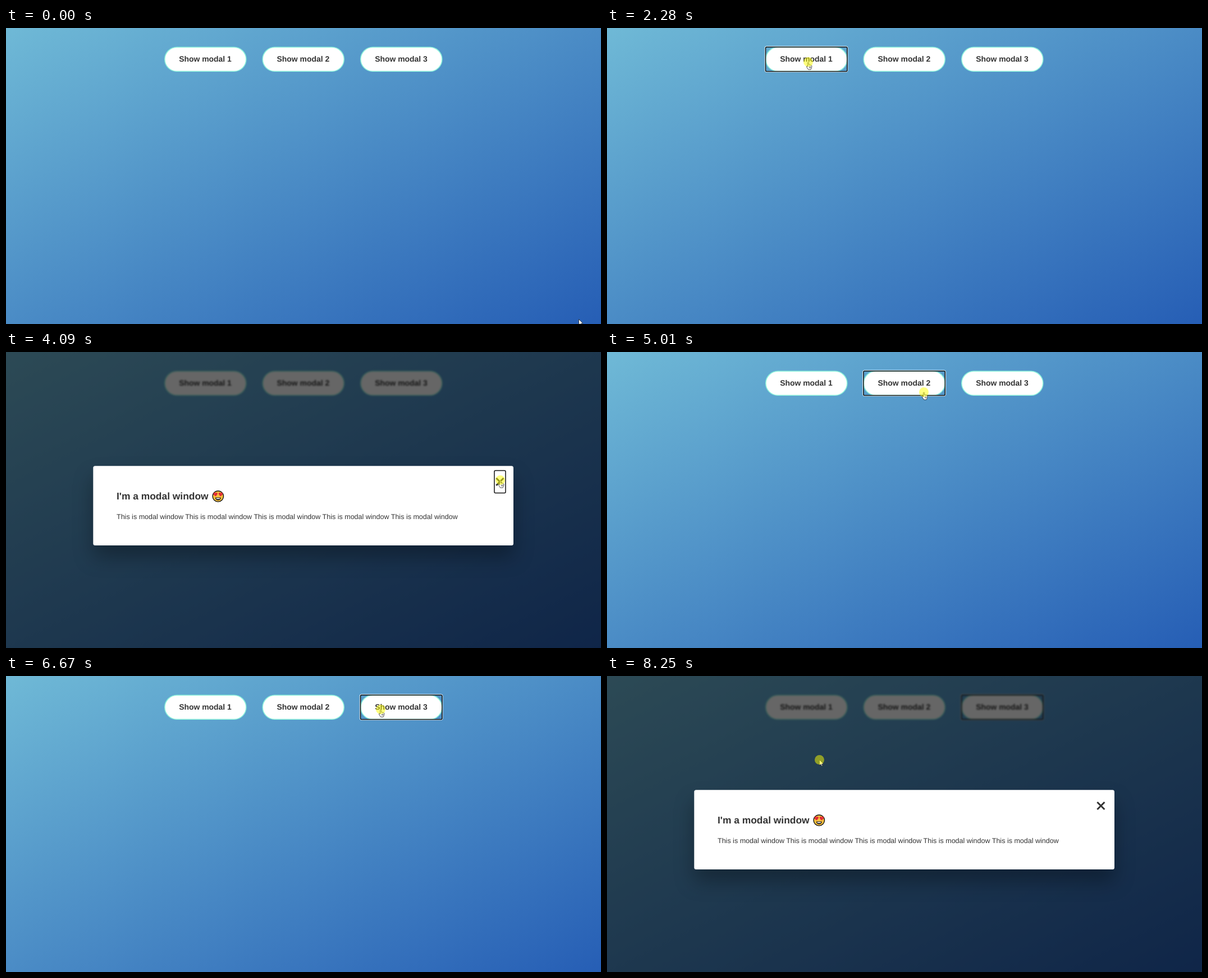
An HTML page that plays this animation: 1060x528 px, repeating every 8.32 s.

```html
<!DOCTYPE html>
<html lang="en">
<head>
<meta charset="utf-8">
<title>Modal windows</title>
<style>
  html, body { margin: 0; width: 100%; height: 100%; overflow: hidden; }
  body { background: linear-gradient(to bottom right, #6fb9d6, #265eb5); }
  svg { position: absolute; left: 0; top: 0; display: block; }
  text { font-family: Arial, "Liberation Sans", sans-serif; fill: #333; text-rendering: geometricPrecision; }
  .label { font-size: 13.95px; font-weight: bold; text-anchor: middle; }
  .title { font-size: 17.4px; font-weight: bold; }
  .copy { font-size: 12.53px; }
  .pill { fill: #fff; stroke: #8ff3dc; stroke-width: 1.6; }
  .panel { fill: #fff; filter: drop-shadow(0 21px 17px rgba(0, 0, 0, .3)); }
  .cross { stroke: #333; stroke-width: 3; }
  .ring { fill: none; stroke: #101010; stroke-width: 1.5; }
  .glow { fill: none; stroke: #fff; }
  .cursor { fill: #fff; stroke: #222; stroke-width: .8; stroke-linejoin: round; }
  .blurred { filter: blur(1.8px); }
</style>
</head>
<body>
<svg width="1060" height="528" viewBox="0 0 1060 528">
  <g id="buttons"></g>
  <g id="modal">
    <rect width="1060" height="528" fill="#000" opacity=".6"/>
    <rect class="panel" x="155.3" y="203.3" width="748.7" height="141.7" rx="3.5"/>
    <text class="title" x="197" y="263.3">I'm a modal window</text>
    <g transform="translate(377.8 257.4)">
      <circle id="face" r="9.7" stroke="#111" stroke-width="1.4"/>
      <g id="hearts" fill="#e32b35">
        <path id="heart" d="M-4.5 0C-9-2.5-9-7-6.5-7Q-5-7-4.5-5.3Q-3.5-7.2-1.8-6.6C.2-5-1.5-2-4.5 0Z"/>
        <use href="#heart" transform="scale(-1 1)"/>
      </g>
      <path d="M-5 2.2H5Q4.5 7.2 0 7.2T-5 2.2Z" fill="#1b1614"/>
      <path d="M-3.5 3.2H3.5L2.8 4.8H-2.8Z" fill="#fff"/>
    </g>
    <text class="copy" id="copy" x="197" y="298"></text>
    <path class="cross" d="M873.4 225l13 13m0-13l-13 13"/>
    <rect class="ring" id="closeRing" x="870" y="211.5" width="20" height="40" rx="2"/>
  </g>
  <g id="pointer">
    <path id="arrow" class="cursor" d="M0 0V10L2.4 8 4 11.4 5.6 10.7 4.1 7.4H7.3Z"/>
    <path id="hand" class="cursor" d="M-1 1Q0-.4 1 1V5L5 5.8Q6.6 6.2 6.3 8L5.8 11 4.6 13.6H0L-3 8.8Q-3.5 7.2-2.2 7.4L-1 8.5ZM2.2 8V11M4 8V11"/>
    <circle id="halo" r="8.5" fill="#ff0" opacity=".5"/>
  </g>
</svg>
<script>
const LOOP = 8320;
const $ = id => document.getElementById(id);
const show = (el, on) => el.style.display = on ? "" : "none";
const within = (t, [from, to]) => t >= from && t < to;

// Pointer moves: start, end, steps, target x, y, optional curve control x, y
const START = [1020, 519];
const MOVES = [
  [70, 70, 1, 1007, 511],
  [300, 870, 8, 669, 384],
  [1110, 1740, 9, 358, 60],
  [2750, 3290, 8, 911, 231, 1187, 611],
  [3460, 3620, 3, 880, 228],
  [4230, 4850, 9, 564, 71],
  [5250, 5860, 9, 878, 233],
  [6180, 6670, 7, 667, 59],
  [6830, 6830, 1, 565, 131],
  [6920, 7240, 5, 378, 149, 440, 178]
];
const OPEN = [[2350, 4150], [5080, 6100], [6750, LOOP]];
const CLICKS = [[2210, 2350], [4090, 4150], [5010, 5080], [6020, 6100], [6670, 6750], [8250, LOOP]];
const FOCUS = [[2280, 4090], [5010, 6100], [6670, LOOP]];
const CLOSE_FOCUS = [4090, 4150];
const BUTTON_X = [282, 456.4, 631];

$("copy").textContent = Array(5).fill("This is modal window").join(" ");
$("buttons").innerHTML = BUTTON_X.map((x, i) => `<g transform="translate(${x} 33.5)">
  <rect class="pill" x=".8" y=".8" width="145" height="43" rx="21.5"/>
  <text class="label" x="73" y="26.7">Show modal ${i + 1}</text>
  <g class="focus">
    <rect class="glow" x="-.7" y="-.7" width="147.6" height="45.6" rx="2.5"/>
    <rect class="ring" x=".5" y=".5" width="145.4" height="43.4" rx="2"/>
  </g></g>`).join("");
const focusRings = document.querySelectorAll(".focus");

function pointerAt(t) {
  let [x, y] = START;
  for (const [from, to, steps, tx, ty, cx = (x + tx) / 2, cy = (y + ty) / 2] of MOVES) {
    if (t < from) break;
    const done = to > from ? Math.floor((t - from) / (to - from) * (steps - 1) + 1e-6) + 1 : steps;
    const p = Math.min(1, done / steps);
    const e = p * p * (3 - 2 * p), r = 1 - e;
    x = r * r * x + 2 * r * e * cx + e * e * tx;
    y = r * r * y + 2 * r * e * cy + e * e * ty;
  }
  return [x, y];
}

function draw(t) {
  const modal = OPEN.findIndex(span => within(t, span));
  const open = modal >= 0;
  show($("modal"), open);
  $("buttons").setAttribute("class", open ? "blurred" : "");
  $("face").setAttribute("fill", modal === 1 ? "#f59b33" : "#f8c03e");
  show($("hearts"), modal !== 1);
  focusRings.forEach((ring, i) => show(ring, within(t, FOCUS[i])));
  show($("closeRing"), within(t, CLOSE_FOCUS));

  const [x, y] = pointerAt(t);
  const overClose = x > 870 && x < 890 && y > 211 && y < 251;
  const overButton = y > 33 && y < 78 && BUTTON_X.some(b => x > b && x < b + 146);
  const hot = open ? overClose : overButton;
  show($("hand"), hot);
  show($("arrow"), !hot);
  show($("halo"), CLICKS.some(span => within(t, span)));
  $("pointer").setAttribute("transform", `translate(${x + .5} ${y + .5})`);
}

const begin = performance.now();
function tick() {
  draw((performance.now() - begin) % LOOP);
  requestAnimationFrame(tick);
}
tick();
</script>
</body>
</html>
```
